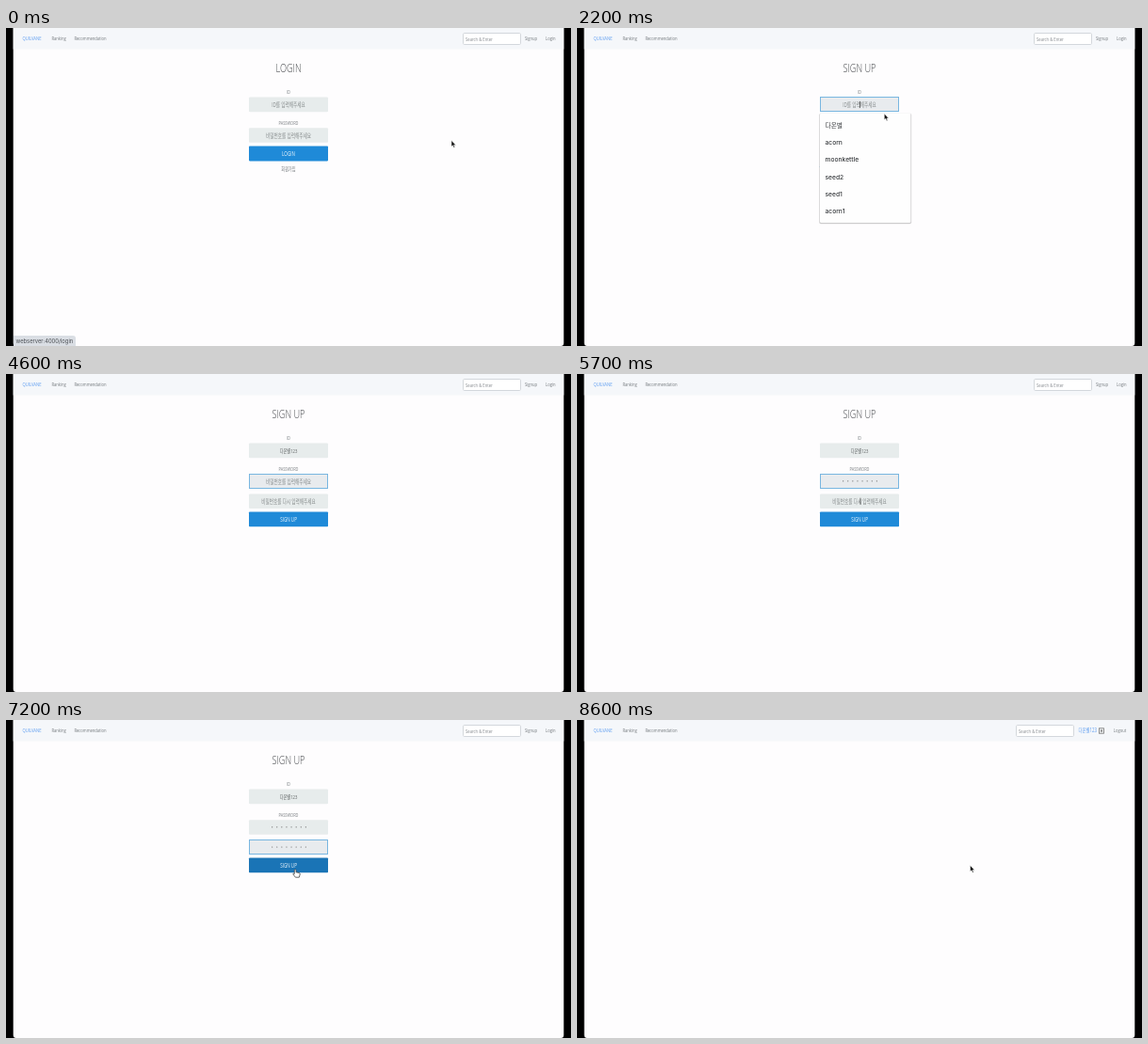
Animation, 600 px wide and 338 px high, one loop 9 s. Source, as an HTML page:

```html
<!DOCTYPE html>
<html lang="ko">
<head>
<meta charset="utf-8">
<title>Sign up</title>
<style>
html, body { margin: 0; width: 100%; height: 100%; overflow: hidden; background: #000; }
svg { display: block; width: 100%; height: 100%; }
text { white-space: pre; }
.thin { font-family: 'Open Sans', 'Noto Sans CJK KR', 'Noto Sans', sans-serif; }
.ui { font-family: Inter, 'Noto Sans CJK KR', Roboto, sans-serif; }
</style>
</head>
<body>
<svg id="stage" viewBox="0 0 600 338"></svg>
<script>
const LOOP = 9000, STEP = 100;
const NARROW = 0.7; // one condensed look for the whole page face
const BLUE = '#1f8ad8', BRAND = '#5c9cf0', GREY = '#74797d';
const stage = document.getElementById('stage');

// Tables of [time, value]; a value holds until the next row.
const status = [[0, 'login'], [200, ''], [600, 'signup'], [1400, '']];
const page = [[0, 'login'], [900, 'signup'], [7600, 'home']];
const focus = [[0, ''], [2000, 'id'], [4600, 'pw'], [5800, 'again'], [7400, '']];
const caret = [[0, ''], [2000, 'id'], [4600, ''], [5700, 'again'], [5800, '']];
const typed = [[0, ''], [3000, 'ㄷ'], [3200, '다'], [3300, '당'], [3400, '다오'],
  [3500, '다온'], [3600, '다온ㅂ'], [3700, '다온벼'], [4000, '다온별'],
  [4100, '다온별1'], [4300, '다온별12'], [4400, '다온별123']];
const dots1 = [[0, 0], [4700, 1], [4800, 2], [4900, 3], [5000, 4],
  [5200, 5], [5300, 6], [5400, 7], [5500, 8]];
const dots2 = [[0, 0], [5800, 1], [5900, 2], [6000, 3], [6100, 4],
  [6400, 5], [6500, 6], [6600, 7], [6700, 8]];
const shape = [[0, 'arrow'], [600, 'hand'], [1300, 'arrow'], [1900, 'beam'], [2100, 'arrow'],
  [3000, ''], [6800, 'arrow'], [6900, 'hand'], [7600, 'arrow']];
// Pointer tip: [time, x, y]
const path = [[0, 473, 119.5], [100, 474, 116], [400, 525, 52], [700, 557.5, 11.3],
  [1200, 557.5, 11.3], [1500, 470, 44], [1900, 312, 81], [2000, 312, 82], [2200, 326.3, 91],
  [2400, 322, 108], [2800, 295, 144], [6800, 295, 144], [7000, 341, 160], [7200, 307.2, 158.6],
  [7500, 307.2, 158.6], [8000, 336, 159], [8200, 350, 160], [8600, 417.5, 154.5]];
const users = ['다온별', 'acorn', 'moonkettle', 'seed2', 'seed1', 'acorn1'];

const at = (table, t) => table.reduce((v, row) => row[0] <= t ? row[1] : v, '');

function tip(t) {
  const i = path.findIndex(p => p[0] > t);
  if (i < 0) return path[path.length - 1].slice(1);
  const [a, b] = [path[i - 1], path[i]];
  const k = (t - a[0]) / (b[0] - a[0]), e = k * k * (3 - 2 * k);
  return [a[1] + (b[1] - a[1]) * e, a[2] + (b[2] - a[2]) * e];
}

const rect = (x, y, w, h, fill, more = '') =>
  `<rect x="${x}" y="${y}" width="${w}" height="${h}" fill="${fill}" ${more}/>`;

// Text in the narrow page face, centred on y.
const thin = (s, x, y, size, fill = GREY, anchor = 'middle', weight = 400) =>
  `<text class="thin" transform="translate(${x} ${y + size * 0.36}) scale(${NARROW} 1)" ` +
  `font-size="${size}" font-weight="${weight}" text-anchor="${anchor}" fill="${fill}">${s}</text>`;

const ui = (s, x, y, size, fill, weight) =>
  `<text class="ui" x="${x}" y="${y + size * 0.36}" font-size="${size}" ` +
  `font-weight="${weight}" fill="${fill}">${s}</text>`;

const bar = (x, y) => rect(x, y - 3.5, 0.7, 7, '#333');

function dots(n, y) {
  let out = '';
  for (let i = 0; i < n; i++)
    out += `<circle cx="${300.5 + (i - (n - 1) / 2) * 5.1}" cy="${y}" r="0.6" fill="#666"/>`;
  return out;
}

function field(y, hint, value, active) {
  const box = active
    ? rect(258.5, Math.floor(y) + 0.5, 83, 15, '#e8ebee', 'stroke="#78b6e0"')
    : rect(258, y, 84, 15.6, '#e7ecec', 'rx="1"');
  return box + (value || thin(hint, 300, y + 8, 6.6, '#858a8b'));
}

const button = (s, y, fill) =>
  rect(258, y, 84, 15.8, fill, 'rx="0.8"') + thin(s, 300, y + 7.8, 6.5, '#f2f8fd');

function header(t) {
  const inside = t >= 8200, x = inside ? 466 : 485;
  let out = rect(7.7, 0, 584.6, 22.5, '#f5f7fa') +
    thin('QUILVANE', 17.5, 11.2, 6, BRAND, 'start') +
    thin('Ranking', 48.5, 11.2, 5.9, GREY, 'start') +
    thin('Recommendation', 72.5, 11.2, 5.9, GREY, 'start') +
    rect(x + 0.5, 5.5, 61, 12, '#fff', 'rx="1.2" stroke="#d0d4d9" stroke-width="0.9"') +
    thin('Search &amp; Enter', x + 3, 11.4, 6, '#85898e', 'start');
  if (inside)
    out += thin('다온별123', 532.5, 11, 6.2, BRAND, 'start') +
      rect(554.5, 8.8, 5, 5.4, '#eceef0', 'stroke="#777" stroke-width="0.8"') +
      rect(556.2, 10.4, 1.6, 2.2, '#777') +
      thin('Logout', 583.2, 11.2, 5.9, GREY, 'end');
  else
    out += thin('Signup', 551, 11.2, 5.9, GREY, 'start') +
      thin('Login', 583.5, 11.2, 5.9, GREY, 'end');
  return out;
}

function form(t) {
  const view = at(page, t);
  if (view === 'home') return '';
  const name = at(typed, t), on = at(focus, t), mark = at(caret, t);
  const n1 = at(dots1, t), n2 = at(dots2, t);
  const title = view === 'login' ? 'LOGIN' : 'SIGN UP';
  let out = thin(title, 300, 42.3, 13.1, '#46494c', 'middle', 300) +
    thin('ID', 300, 68.4, 5.6) + thin('PASSWORD', 300, 101.3, 5.6) +
    field(73.6, 'ID를 입력해주세요', name && thin(name, 300, 81.6, 6, '#5c6061'), on === 'id') +
    field(106.2, '비밀번호를 입력해주세요', n1 && dots(n1, 113.8), on === 'pw');
  if (view === 'login')
    return out + button('LOGIN', 125.6, BLUE) + thin('회원가입', 300, 149.5, 6);
  const hover = at(shape, t) === 'hand' && t > 6000;
  out += field(127.4, '비밀번호를 다시 입력해주세요', n2 && dots(n2, 135), on === 'again') +
    button('SIGN UP', 146.4, hover ? '#1a74b6' : BLUE);
  if (mark === 'id') {
    const digits = name.replace(/\D/g, '').length;
    out += bar(300.2 + ((name.length - digits) * 3.9 + digits * 2.4) / 2, 81.4);
  }
  if (mark === 'again') out += bar(300.6, 135.2);
  return out;
}

function menu(t) {
  if (t < 2100 || t >= 2700) return '';
  return rect(257, 90.4, 98.4, 118, '#000', 'rx="2" opacity="0.08"') +
    rect(257.5, 91, 97.3, 117, '#000', 'rx="1.6" opacity="0.13"') +
    rect(258, 90.4, 96.3, 116.6, '#fefefe', 'rx="1.5"') +
    users.map((u, i) => ui(u, 263.5, 103.2 + i * 18.3, 6.7, '#34373a', 500)).join('');
}

function hint(t) {
  const s = at(status, t);
  if (!s) return '';
  const w = s === 'login' ? 66 : 72;
  return `<path d="M8 327h${w - 3}q3 0 3 3v8h-${w}z" fill="#dadee4"/>` +
    ui('webserver:4000/' + s, 10.5, 332.8, 5.8, '#4b4f54', 400);
}

function pointer(t) {
  const kind = at(shape, t);
  if (!kind) return '';
  const art = {
    arrow: '<path d="M0 0V6.6L1.5 5.3 2.6 7.8 3.7 7.3 2.6 4.9H4.7Z" fill="#111" stroke="#fff" stroke-width=".5"/>',
    hand: '<path d="M-.9.7Q0-.5.8.7V3.2L4.2 3.9Q5.2 4.2 5 5.4L4.1 8.6H.2L-2.4 5.3Q-2.4 4-.9 5Z" fill="#fff" stroke="#444" stroke-width=".8"/>',
    beam: '<path d="M-1.2-3.5H1.2M0-3.5V3.5M-1.2 3.5H1.2" fill="none" stroke="#333" stroke-width=".7"/>'
  };
  const [x, y] = tip(t);
  return `<g transform="translate(${x} ${y})">${art[kind]}</g>`;
}

function scene(t) {
  return rect(0, 0, 600, 338, '#000') +
    '<path d="M7.7 0H592.3V335q0 3-3 3H10.7q-3 0-3-3Z" fill="#fefdfe"/>' +
    header(t) + form(t) + menu(t) + hint(t) + pointer(t);
}

let shown = -1;
const start = performance.now();
function tick() {
  const t = Math.floor((performance.now() - start) % LOOP / STEP) * STEP;
  if (t !== shown) stage.innerHTML = scene(shown = t);
  requestAnimationFrame(tick);
}
tick();
</script>
</body>
</html>
```
